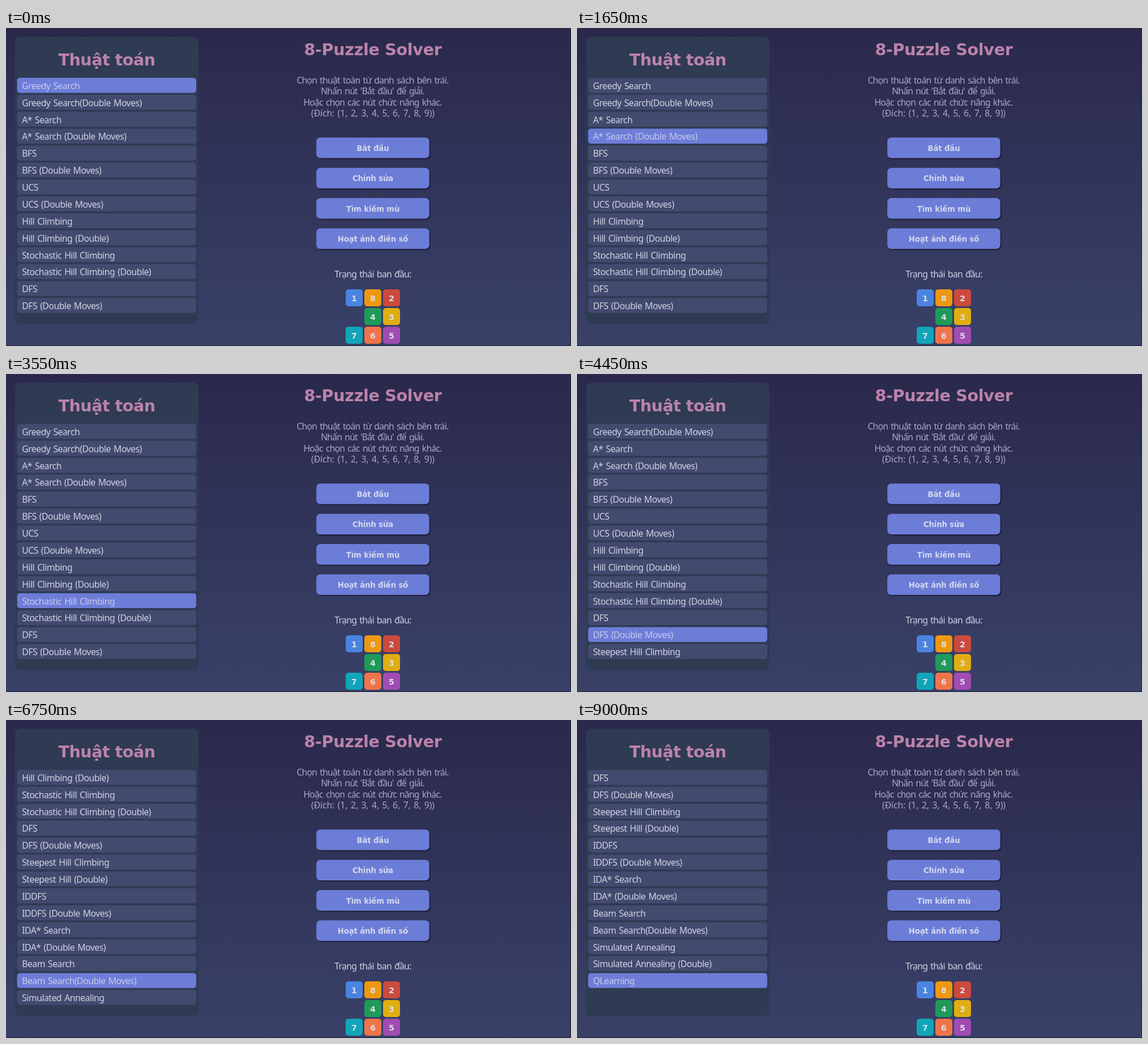
Animation, 998 px wide and 561 px high, one loop 9050 ms. Source, as an HTML page with a canvas:

```html
<!DOCTYPE html>
<html lang="vi">
<head>
<meta charset="utf-8">
<title>8-Puzzle Solver</title>
<style>
  html, body { margin: 0; width: 100%; height: 100%; overflow: hidden; background: #2f3059; }
  canvas { display: block; }
</style>
</head>
<body>
<canvas id="stage" width="998" height="561"></canvas>
<script>
const W = 998, H = 561, LOOP = 9050;
const ctx = document.getElementById('stage').getContext('2d');

const algorithms = [
  'Greedy Search', 'Greedy Search(Double Moves)',
  'A* Search', 'A* Search (Double Moves)',
  'BFS', 'BFS (Double Moves)',
  'UCS', 'UCS (Double Moves)',
  'Hill Climbing', 'Hill Climbing (Double)',
  'Stochastic Hill Climbing', 'Stochastic Hill Climbing (Double)',
  'DFS', 'DFS (Double Moves)',
  'Steepest Hill Climbing', 'Steepest Hill (Double)',
  'IDDFS', 'IDDFS (Double Moves)',
  'IDA* Search', 'IDA* (Double Moves)',
  'Beam Search', 'Beam Search(Double Moves)',
  'Simulated Annealing', 'Simulated Annealing (Double)',
  'QLearning'
];
const ROWS = 14, ROW_STEP = 29.87, LAST_FOCUS = 12;
const FIRST_MOVE = 965, MOVE_EVERY = 285;

const intro = [
  'Chọn thuật toán từ danh sách bên trái.',
  "Nhấn nút 'Bắt đầu' để giải.",
  'Hoặc chọn các nút chức năng khác.'
];
const buttons = ['Bắt đầu', 'Chỉnh sửa', 'Tìm kiếm mù', 'Hoạt ảnh điền số'];
const board = [1, 8, 2, 0, 4, 3, 7, 6, 5];
const tileColors = ['', '#4a84e0', '#cb4a3d', '#e0ad12', '#1f9a59',
                    '#a14cb2', '#f0744a', '#10a5b9', '#ee980f'];

function box(x, y, w, h, r, color) {
  ctx.fillStyle = color;
  ctx.beginPath();
  ctx.roundRect(x, y, w, h, r);
  ctx.fill();
}

function label(str, x, y, size, color, { bold, align = 'center', letter = 0, word = 0 } = {}) {
  ctx.font = bold
    ? `700 ${size}px "DejaVu Sans", "Noto Sans", sans-serif`
    : `400 ${size}px "Noto Sans", "Open Sans", sans-serif`;
  ctx.letterSpacing = letter + 'px';
  ctx.wordSpacing = word + 'px';
  ctx.textAlign = align;
  ctx.fillStyle = color;
  ctx.fillText(str, x, y);
}

function drawBackground() {
  const sky = ctx.createLinearGradient(0, 0, 0, H);
  sky.addColorStop(0, '#2a294c');
  sky.addColorStop(1, '#394168');
  ctx.fillStyle = sky;
  ctx.fillRect(0, 0, W, H);
  ctx.fillStyle = '#1b1c34';
  ctx.fillRect(0, H - 1, W, 1);
  ctx.fillRect(W - 1, 0, 1, H);
}

function drawList(selected) {
  box(16, 15.5, 324, 506.5, 9, '#2f3a53');
  label('Thuật toán', 178, 66, 28.6, '#bb83a9', { bold: true, letter: -0.5 });
  const top = Math.max(0, selected - LAST_FOCUS);
  algorithms.slice(top, top + ROWS).forEach((name, i) => {
    const active = top + i === selected;
    const y = 88 + i * ROW_STEP;
    box(19.6, y, 316.4, 26.4, 5, active ? '#6d7dd8' : '#424a6e');
    label(name, 28.2, y + 19.8, 15.8, active ? '#c6cbec' : '#d0d3e2',
          { align: 'left', letter: -0.52, word: 1.5 });
  });
}

function drawControls() {
  label('8-Puzzle Solver', 648, 47.6, 28.6, '#bb83a9', { bold: true, letter: -0.3 });
  intro.forEach((line, i) =>
    label(line, 647.5, 98 + i * 19.4, 15.7, '#a8aac1', { letter: -0.78, word: 1.8 }));
  label('(Đích: (1, 2, 3, 4, 5, 6, 7, 8, 9))', 648, 156, 15.7, '#a8aac1', { letter: -0.1, word: 1.6 });

  buttons.forEach((name, i) => {
    const y = 193.2 + i * 53.45;
    box(550, y + 2, 199.5, 36.3, 7, '#1d1d39');
    box(548.2, y, 199.5, 36.3, 7, '#6c7dd7');
    label(name, 648, y + 23.8, 13.2, '#d4d8ee', { bold: true, letter: -0.1 });
  });
}

function drawBoard() {
  label('Trạng thái ban đầu:', 648, 440.3, 15.8, '#d0d3e2', { letter: -0.7, word: 1.5 });
  board.forEach((n, i) => {
    if (!n) return;
    const x = 600 + (i % 3) * 33, y = 461 + Math.floor(i / 3) * 33;
    box(x, y, 30, 30, 5, tileColors[n]);
    label(String(n), x + 15, y + 20.8, 14.2, '#dcdfe9', { bold: true });
  });
}

function selectionAt(t) {
  const moves = Math.floor((t - FIRST_MOVE) / MOVE_EVERY) + 1;
  return Math.max(0, Math.min(algorithms.length - 1, moves));
}

function frame() {
  drawBackground();
  drawList(selectionAt(performance.now() % LOOP));
  drawControls();
  drawBoard();
  requestAnimationFrame(frame);
}
frame();
</script>
</body>
</html>
```
